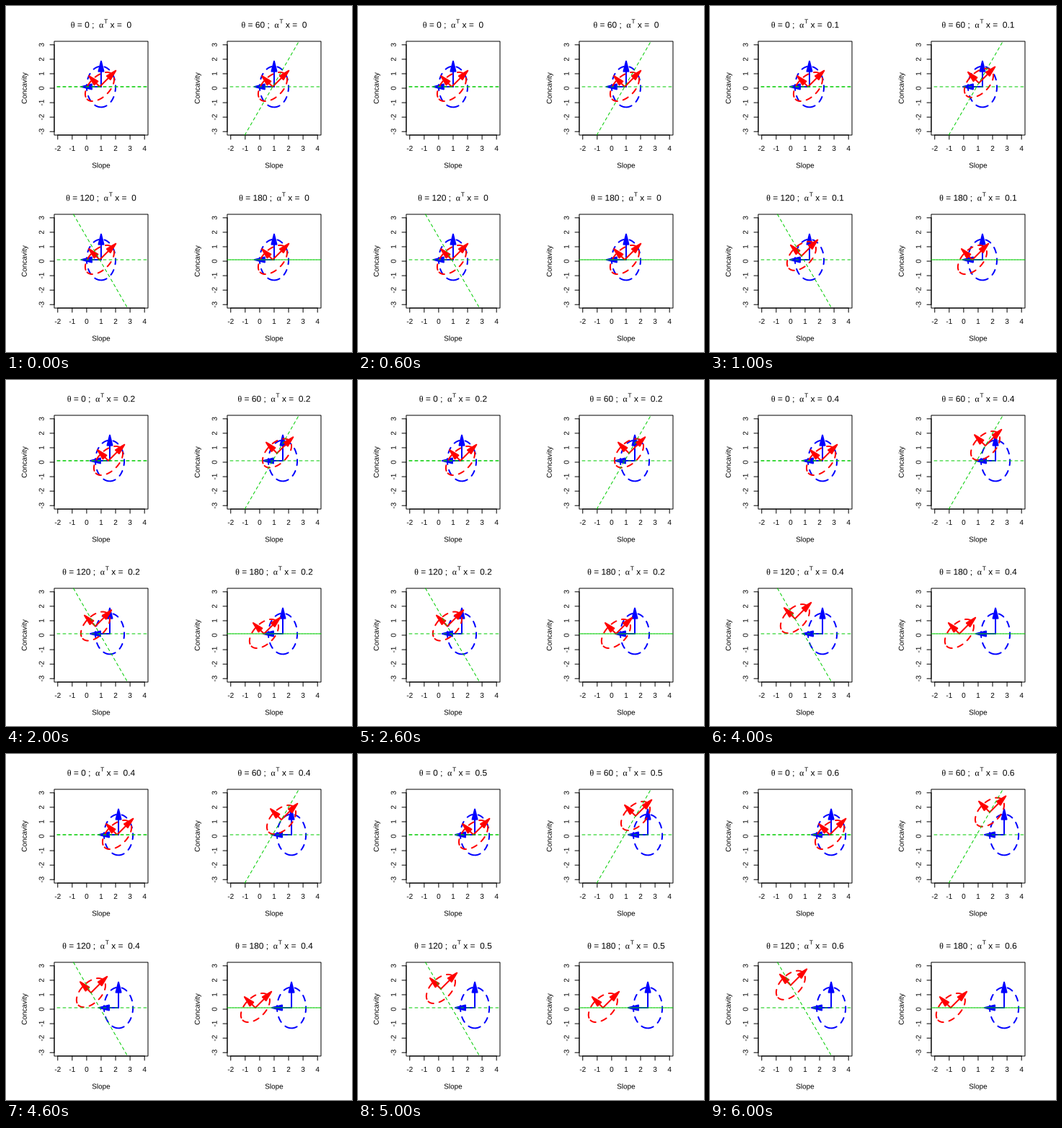
These frames come from a looping animation (480x480 px, 7 s). A matplotlib script:

```python
import numpy as np
import matplotlib.pyplot as plt
from matplotlib.animation import FuncAnimation
from matplotlib.patches import PathPatch, Polygon
from matplotlib.path import Path
from matplotlib.textpath import TextPath
from matplotlib.transforms import Affine2D

SIZE = 480
PX = 0.72                # points per pixel at 100 dpi
LINE = 0.166 * 72        # height of one margin line
LEFT, TOP, SIDE = 66.94, 49.0, 130.04
SCALE = SIDE / 6.48      # pixels per data unit
SANS, SERIF = "Liberation Sans", "Liberation Serif"
GREEN = (0, 205 / 255, 0)
START_BLUE, START_RED = np.array([1, 0.1]), np.array([0.9, 0.1])
STEP = 0.3

fig = plt.figure(figsize=(4.8, 4.8), dpi=100, facecolor="white")
ax = fig.add_axes([0, 0, 1, 1])
ax.set_xlim(0, SIZE)
ax.set_ylim(SIZE, 0)
ax.axis("off")


def glyphs(text, size, family):
    return TextPath((0, 0), text, size=size, prop={"family": family})


def advance(text, size, family):
    """Width of text including its outer spaces."""
    end = glyphs(text + "|", size, family).get_extents().x1
    return end - glyphs("|", size, family).get_extents().x1


def label(text, x, y, angle=0):
    """Text centred along its baseline at x, y."""
    size = 0.83 * 12
    place = (Affine2D().translate(-advance(text, size, SANS) / 2, 0)
             .rotate_deg(angle).scale(1, -1).translate(x, y))
    ax.add_patch(PathPatch(glyphs(text, size, SANS), fc="black", lw=0,
                           snap=False, transform=place + ax.transData))


def title_path(theta, value):
    big, small = 11.95, 8.4
    gap = big * 5 / 18
    parts = [("θ", SERIF, big, 0, gap), ("=", SANS, big, 0, gap),
             (f"{theta} ;  ", SANS, big, 0, 0), ("α", SERIF, big, 0, 0.8),
             ("T", SANS, small, 6, 0), (f" x =  {value:g}", SANS, big, 0, 0)]
    x, verts, codes = 0, [], []
    for text, family, size, rise, space in parts:
        path = glyphs(text, size, family)
        verts.append(path.vertices + [x, rise])
        codes.append(path.codes)
        x += advance(text, size, family) + space
    return Path(np.concatenate(verts) - [x / 2, 0], np.concatenate(codes))


def stroke(x, y, color="black", width=1, transform=None, **style):
    style.setdefault("solid_capstyle", "round")
    line, = ax.plot(x, y, color=color, lw=width * PX, snap=False,
                    dash_capstyle="round", solid_joinstyle="round",
                    transform=transform or ax.transData, **style)
    return line


def arrow(tip, color, transform, z):
    """Shaft from the origin, with a head centred on its end."""
    along = tip / np.hypot(*tip)
    across = np.array([-along[1], along[0]])
    half, wide = 7.05, 3.53
    stroke([0, tip[0]], [0, tip[1]], color, 2, transform, zorder=z)
    head = [tip + half * along, tip - half * along + wide * across,
            tip - half * along - wide * across]
    ax.add_patch(Polygon(head, closed=True, fc=color, ec=color, lw=2 * PX,
                         joinstyle="round", snap=False,
                         transform=transform, zorder=z))


def spread(first, second, color, z):
    """Dashed ellipse and its two principal arrows, free to move."""
    shift = Affine2D()
    transform = shift + ax.transData
    flip = np.array([SCALE, -SCALE])
    a, b = np.array(first) * flip, np.array(second) * flip
    t = np.linspace(0, 2 * np.pi, 250)[:, None]
    curve = -(np.cos(t) * a + np.sin(t) * b)
    stroke(curve[:, 0], curve[:, 1], color, 2, transform,
           ls=(0, (4, 4)), zorder=z)
    arrow(a, color, transform, z + 0.1)
    arrow(b, color, transform, z + 0.1)
    return shift


class Panel:
    def __init__(self, dx, dy, theta):
        self.theta = theta
        self.left, self.top = LEFT + dx, TOP + dy
        self.right, self.bottom = self.left + SIDE, self.top + SIDE
        self.draw_axes()
        self.blue = spread((0, 2 ** 0.5), (-1, 0), "blue", 3)
        self.red = spread((0.75 ** 0.5, 0.75 ** 0.5), (-0.5, 0.5), "red", 4)
        self.draw_guides()
        place = Affine2D().scale(1, -1).translate(
            self.left + SIDE / 2, 30.2 + dy)
        self.title = PathPatch(title_path(theta, 0), fc="black", lw=0,
                               snap=False, transform=place + ax.transData)
        ax.add_patch(self.title)

    def pixel(self, x, y):
        return (self.left + (x + 2.24) * SCALE,
                self.top + (3.24 - y) * SCALE)

    def draw_axes(self):
        l, r, t, b = self.left, self.right, self.top, self.bottom
        ax.add_patch(Polygon([(l, t), (r, t), (r, b), (l, b)], fill=False,
                             ec="black", lw=PX, snap=False))
        tick = LINE / 2
        for n in range(-2, 5):
            x = self.pixel(n, 0)[0]
            stroke([x, x], [b, b + tick])
            label(str(n), x, b + 1.8 * LINE + 0.3)
        for n in range(-3, 4):
            y = self.pixel(0, n)[1]
            stroke([l, l - tick], [y, y])
            label(str(n), l - 1.2 * LINE, y, 90)
        stroke([self.pixel(-2, 0)[0], self.pixel(4, 0)[0]], [b, b])
        stroke([l, l], [self.pixel(0, -3)[1], self.pixel(0, 3)[1]])
        label("Slope", (l + r) / 2, b + 3.8 * LINE)
        label("Concavity", l - 3.2 * LINE, (t + b) / 2, 90)

    def draw_guides(self):
        x0, y0 = self.pixel(*START_RED)
        flat = [self.left, self.right], [y0, y0]
        stroke(*flat, GREEN, ls=(4, (4, 4)), zorder=6)
        if self.theta % 180:
            slope = np.tan(np.radians(self.theta))
            ends = np.array([self.bottom, self.top])
            if slope < 0:
                ends = ends[::-1]
            stroke(x0 + (y0 - ends) / slope, ends, GREEN,
                   ls=(0, (4, 4)), zorder=6)
        else:
            phase = 0 if self.theta else 4
            stroke(*flat, GREEN, ls=(phase, (4, 4)), zorder=6)

    def show(self, step):
        move = STEP * step
        angle = np.radians(self.theta)
        heading = np.array([np.cos(angle), np.sin(angle)])
        blue = self.pixel(*(START_BLUE + [move, 0]))
        red = self.pixel(*(START_RED + move * heading))
        self.blue.clear().translate(*blue)
        self.red.clear().translate(*red)
        self.title.set_path(title_path(self.theta, step / 10))


panels = [Panel(240 * (k % 2), 240 * (k // 2), 60 * k) for k in range(4)]


def update(step):
    for panel in panels:
        panel.show(step)
    return []


anim = FuncAnimation(fig, update, frames=7, interval=1000,
                     init_func=lambda: update(0), repeat=True)
plt.show()
```
